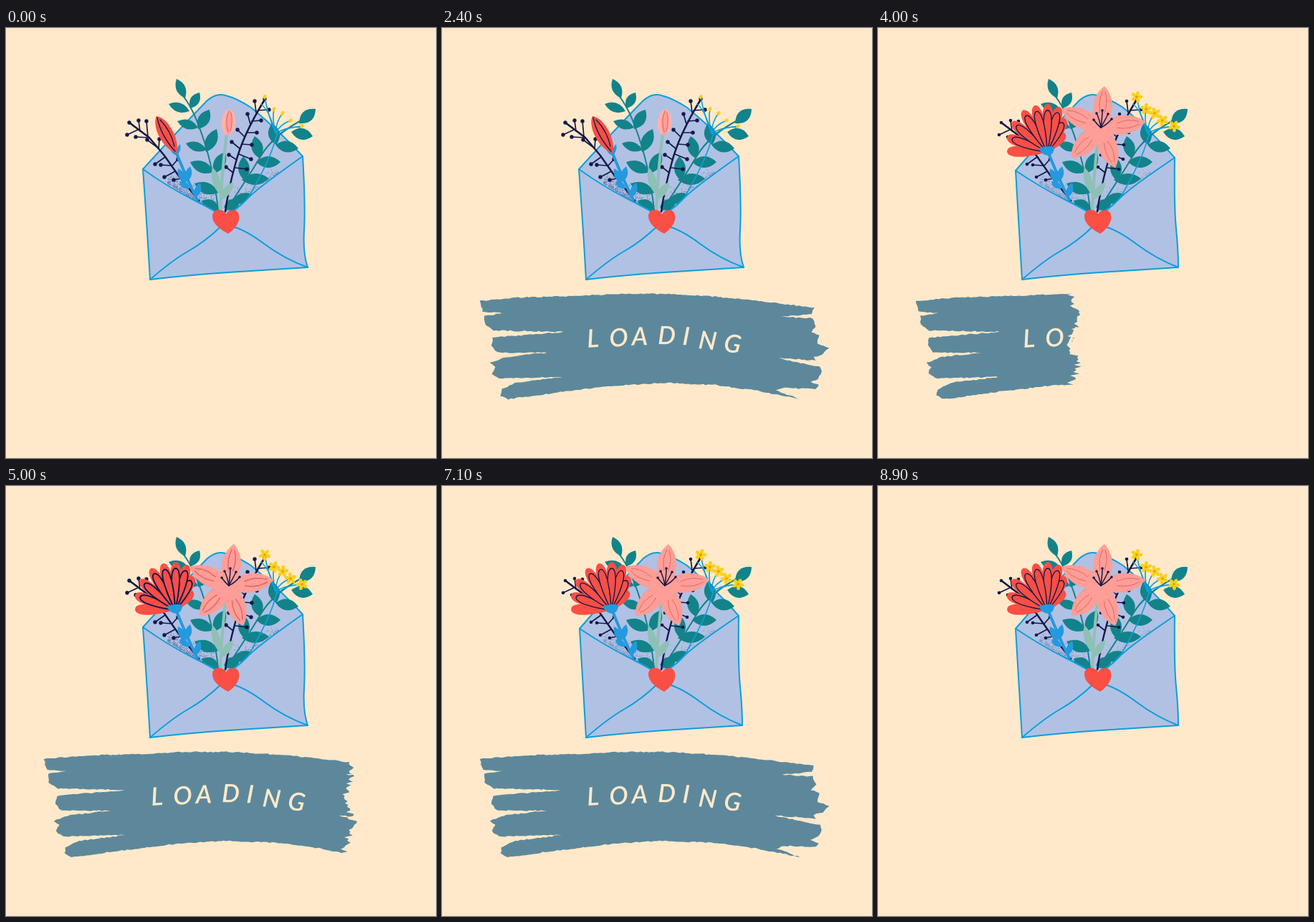
Write an HTML page that moves like this. It is 600 by 600 pixels and loops after 9 s.

```html
<!DOCTYPE html>
<html lang="en">
<head>
<meta charset="utf-8">
<title>Loading</title>
<style>
  html, body { margin: 0; width: 100%; height: 100%; overflow: hidden; background: #ffe9ca; }
  svg { display: block; width: 100vw; height: 100vh; }
  text { font: italic 600 35px Lato, "Open Sans", sans-serif; fill: #ffe9ca; }
</style>
</head>
<body>
<svg id="stage" viewBox="0 0 600 600" stroke-linecap="round" stroke-linejoin="round"></svg>
<script>
const C = {
  env: '#b0c1e4', line: '#0a9fdb', teal: '#12838a', navy: '#14194b', red: '#f94f45',
  pink: '#ff9e96', rose: '#ffb3aa', sage: '#8fc0b6', blue: '#2499dd', gold: '#f9d01a',
  orange: '#e89a10', vein: '#e2656b', brush: '#5d889b', dust: '#5f6f9e'
};

function rng(seed) {
  return () => {
    seed = (seed * 1664525 + 1013904223) >>> 0;
    return seed / 4294967296;
  };
}

const fill = (d, c) => `<path d="${d}" fill="${c}"/>`;
const stroke = (d, c, w = 2) => `<path d="${d}" fill="none" stroke="${c}" stroke-width="${w}"/>`;
const dot = (x, y, r, c) => `<circle cx="${x}" cy="${y}" r="${r}" fill="${c}"/>`;

// Pointed leaf from base to tip.
function leaf(x1, y1, x2, y2, w) {
  const len = Math.hypot(x2 - x1, y2 - y1);
  const nx = -(y2 - y1) / len * w, ny = (x2 - x1) / len * w;
  const mx = (x1 + x2) / 2, my = (y1 + y2) / 2;
  return `M${x1} ${y1}Q${mx + nx} ${my + ny} ${x2} ${y2}Q${mx - nx} ${my - ny} ${x1} ${y1}Z`;
}

// Petal whose sides bulge by a at fraction p and by b at fraction q.
function petal(x1, y1, x2, y2, a, p, b, q) {
  const dx = x2 - x1, dy = y2 - y1, len = Math.hypot(dx, dy);
  const at = (f, n) => `${x1 + dx * f - dy / len * n} ${y1 + dy * f + dx / len * n}`;
  return `M${x1} ${y1}C${at(p, a)} ${at(q, b)} ${x2} ${y2}C${at(q, -b)} ${at(p, -a)} ${x1} ${y1}Z`;
}

const leaves = (rows, c, w) => rows.map(r => fill(leaf(...r, w), c)).join('');

function twigs(stem, rows, r) {
  return stroke(stem, C.navy, 2.4) + rows.map(([x1, y1, x2, y2]) =>
    stroke(`M${x1} ${y1}L${x2} ${y2}`, C.navy, 1.7) + dot(x2, y2, r, C.navy)).join('');
}

function dust(opacity) {
  const rand = rng(7);
  let d = '';
  for (let i = 0; i < 900; i++) {
    const side = i % 5 < 3;
    const u = rand(), h = rand() * rand() * 42 * (0.35 + u * 0.65);
    const x = side ? 225 + u * 75 : 380 - u * 72;
    const y = (side ? 217 + u * 45 : 206 + u * 56) - h;
    d += `M${x.toFixed(1)} ${y.toFixed(1)}h.1`;
  }
  return `<g opacity="${opacity}">${stroke(d, C.dust, 1)}</g>`;
}

function foliage(v) {
  const r = v ? 2.3 : 2.7;
  return stroke('M296 256Q290 190 268 134Q260 112 248 96', C.teal, 2) +
    leaves([[250, 98, 238, 71], [257, 112, 270, 90]], C.teal, 13) +
    leaves([[256, 116, 227, 106], [268, 139, 239, 130], [280, 170, 251, 161]], C.teal, 13) +
    leaves([[268, 141, 284, 114], [279, 173, 294, 141], [290, 203, 306, 173],
      [290, 201, 257, 187], [296, 230, 263, 217], [297, 254, 273, 241]], C.teal, 16) +
    stroke('M306 256Q340 205 356 178T410 130', C.teal, 2) +
    leaves([[409, 133, 432, 113], [398, 145, 428, 151], [376, 163, 408, 168],
      [377, 163, 371, 133], [354, 182, 347, 151], [349, 187, 383, 187],
      [333, 213, 331, 179], [329, 212, 367, 210], [316, 239, 351, 237], [304, 250, 326, 244]], C.teal, 16) +
    twigs('M269 241L240 205L221 178L200 153L172 132', [
      [199, 152, 172, 132], [184, 142, 169, 149], [187, 144, 185, 129], [198, 152, 196, 130],
      [200, 153, 181, 152], [213, 168, 197, 156], [213, 168, 214, 155], [222, 180, 208, 190],
      [231, 192, 216, 191], [236, 200, 221, 208], [244, 210, 234, 212], [232, 192, 240, 183]], r) +
    twigs('M306 256Q310 226 320 190Q330 150 361 100', [
      [354, 111, 361, 99], [349, 118, 347, 102], [351, 115, 367, 114], [341, 134, 337, 120],
      [343, 130, 356, 129], [333, 152, 323, 142], [336, 146, 350, 146], [327, 169, 315, 159],
      [329, 162, 343, 163], [322, 184, 311, 177], [325, 176, 342, 183], [317, 202, 307, 194],
      [320, 195, 336, 197]], r) +
    stroke('M267 240Q252 210 236 170', C.blue, 4) +
    leaves([[251, 217, 240, 196], [252, 215, 257, 193], [264, 237, 271, 216], [256, 224, 242, 214]], C.blue, 9) +
    stroke('M299 254Q302 190 308 148', C.sage, 4) +
    leaves([[299, 233, 288, 194], [299, 240, 317, 215]], C.sage, 11);
}

const sprigs = [[361, 96], [374, 113], [386, 119], [397, 129], [413, 137]];

function yellow(open, v) {
  const stems = sprigs.map(([x, y]) => `M376 147Q${(x + 368) / 2} ${(y + 140) / 2} ${x} ${y}`).join('');
  let s = stroke('M335 242Q362 196 372 168T376 145' + stems, C.line, 1.6) +
    stroke('M376 147Q369 118 356 106M378 150Q395 136 411 139', C.line, 1.3);
  sprigs.forEach(([x, y], i) => {
    if (!open) {
      s += `<ellipse cx="${x}" cy="${y}" rx="2.3" ry="3" fill="${C.gold}" transform="rotate(${20 + i * 9} ${x} ${y})"/>`;
      return;
    }
    for (let k = 0; k < 5; k++) {
      const a = k * Math.PI * 0.4 + i + (v ? 0 : 0.35);
      s += fill(petal(x, y, x + 8.5 * Math.cos(a), y + 8.5 * Math.sin(a), 3, .3, 3.6, .9), C.gold);
    }
    s += dot(x, y, 1.7, C.orange);
  });
  return s;
}

function buds() {
  return fill(leaf(238, 178, 229, 166, 5) + leaf(238, 178, 243, 162, 5), C.blue) +
    fill(petal(238, 175, 210, 123, 14, .25, 13, .85), C.red) +
    stroke('M211 125Q216 150 236 172M215 128Q230 143 235 165', C.navy, 1.3) +
    fill(petal(309, 150, 312, 113, 14, .15, 13, .85), C.rose) +
    fill(petal(310, 150, 312, 114, 7, .2, 7, .8), C.pink) +
    stroke('M310 145Q305 128 311 116M313 144Q317 130 314 118', C.vein, 1);
}

function redFlower(v) {
  const tips = [[180, 172], [260, 146], [180, 152], [261, 126], [187, 131], [253, 110], [202, 115], [237, 106], [219, 108]];
  const lw = v ? 1.4 : 2;
  const shape = (k, w) => tips.map(([x, y]) =>
    petal(236, 173, 236 + (x - 236) * k, 173 + (y - 173) * k, w * .5, .35, w, .98));
  return shape(1, 13).map(d => fill(d, C.red)).join('') +
    shape(.87, 9.5).slice(2).map(d =>
      `<path d="${d}" fill="${C.red}" stroke="${C.navy}" stroke-width="${lw}"/>`).join('') +
    fill('M224 168Q236 163 246 166Q246 175 239 178Q229 178 224 168Z', C.blue);
}

function lily(v) {
  const cx = 311, cy = 139;
  const tips = [[v ? 316 : 318, 81], [373, 131], [331, 195], [270, 181], [256, 113]];
  let s = '';
  for (const [x, y] of tips) s += fill(petal(cx, cy, x, y, 19, .2, 17, .75), C.pink);
  for (const [x, y] of tips) {
    const dx = x - cx, dy = y - cy;
    for (const n of [-.1, .1]) {
      const at = (f, m) => `${cx + dx * f - dy * n * m} ${cy + dy * f + dx * n * m}`;
      s += stroke(`M${at(.36, .5)}Q${at(.62, 1.3)} ${at(.86, .3)}`, C.vein, v ? 1 : 1.5);
    }
  }
  for (const [x, y] of [[301, 128], [305, 119], [313, 115], [321, 120], [326, 127]]) {
    s += stroke(`M${cx} ${cy}Q${(x + cx) / 2 + 1} ${y + 8} ${x} ${y}`, C.navy, 1.5) + dot(x, y, 1.8, C.navy);
  }
  return s;
}

// Two hand-drawn outlines of the envelope: v = 0 or 1.
function envelope(v, inside, grain) {
  const l = v ? '192 199' : '191 197', r = v ? '414 181' : '414 179';
  const bl = '201 351', br = v ? '419 334' : '421 334';
  const flap = `M${l}Q240 143 281 101Q294 90 306 94Q322 98 342 111Q382 144 ${r}`;
  const fold = `M${l}Q228 223 262 240T303 264Q322 254 336 239T${r}`;
  const sides = `Q${v ? '413 250 416 280' : '418 250 416 282'}T${br}Q370 337 310 341T${bl}Q197 280 ${l}`;
  return fill(flap + 'L303 266Z', C.env) + dust(grain) + stroke(flap, C.line) + inside +
    fill(fold + sides + 'Z', C.env) + stroke(fold + sides, C.line) +
    stroke(`M${bl}Q232 324 255 311T302 275M${br}Q388 322 360 301T312 276`, C.line) +
    fill('M310 287Q287 275 288 261Q290 252 299 254Q305 255 307 260Q311 253 319 254Q327 257 325 268Q322 279 310 287Z', C.red);
}

function scene(open, v) {
  const blooms = open ? redFlower(v) + lily(v) : buds();
  const back = foliage(v) + yellow(open, v);
  // Blooms stand above the flap but behind the front fold.
  return envelope(v, back + blooms, v ? .45 : .85);
}

const outline = [
  [53, 381], [110, 376], [185, 374], [250, 371], [312, 371], [385, 375], [450, 382], [519, 390],
  [516, 399], [474, 403], [517, 405], [522, 416], [515, 424], [526, 429], [524, 440], [540, 447],
  [531, 455], [519, 459], [522, 464], [465, 460], [528, 473], [530, 480], [525, 489], [514, 494],
  [526, 498], [521, 504], [478, 502], [466, 506], [500, 518], [440, 506], [380, 498], [312, 495],
  [240, 499], [165, 508], [92, 518], [82, 513], [83, 504], [102, 495], [168, 487], [80, 489],
  [70, 482], [74, 473], [67, 467], [90, 459], [146, 453], [77, 453], [69, 443], [71, 432],
  [170, 424], [72, 422], [60, 414], [59, 402], [84, 398], [57, 396]
];

// Rough brush edge, subdivided and shaken.
function rough(seed) {
  const rand = rng(seed), pts = [];
  outline.forEach(([x, y], i) => {
    const [x2, y2] = outline[(i + 1) % outline.length];
    const n = Math.max(1, Math.round(Math.hypot(x2 - x, y2 - y) / 4));
    for (let k = 0; k < n; k++) {
      const j = () => (rand() - .5) * 1.6;
      pts.push((x + (x2 - x) * k / n + j()).toFixed(1) + ' ' + (y + (y2 - y) * k / n + j()).toFixed(1));
    }
  });
  return 'M' + pts.join('L') + 'Z';
}

const strokes = [11, 23, 37].map(rough);
const poses = { bud: scene(false, 0), openA: scene(true, 0), openB: scene(true, 1) };

const stage = document.getElementById('stage');
stage.innerHTML = `
  <clipPath id="wipe"><path id="edge"/></clipPath>
  ${Object.entries(poses).map(([id, s]) => `<g id="${id}">${s}</g>`).join('')}
  <path id="paint" fill="${C.brush}" clip-path="url(#wipe)"/>
  <text x="203 234 265 301 335 357 392" y="446 445 443 441 442 447 451" rotate="-4 -3 -2 1 4 6 8">LOADING</text>`;

const el = id => document.getElementById(id);
const paint = el('paint'), edge = el('edge');
const groups = Object.keys(poses).map(el);

const bloom = [
  [0, 'bud'], [250, 'openB'], [450, 'openA'], [650, 'openB'], [850, 'openA'], [1000, 'openB'],
  [1150, 'openA'], [1350, 'openB'], [1550, 'openA'], [1720, 'openB'], [1920, 'openA'], [2120, 'openB']
];

// Right end of the brush stroke: painted on, held, wiped back.
function reach(t) {
  const x = t < 2000 ? 30 + t * .9 : 275 - (t - 4000) * .887;
  return Math.max(30, Math.min(570, x));
}

function wipePath(x) {
  if (x <= 30) return 'M0 0Z';
  const rand = rng(Math.round(x));
  let d = 'M0 360';
  for (let y = 360; y <= 530; y += 2.5) {
    const tip = 5 * Math.sin(y / 11 - 35) - 2 + (rand() - .5) * 14;
    d += `L${(x + tip).toFixed(1)} ${y}`;
  }
  return d + 'L0 530Z';
}

let last = -1;
function draw(now) {
  const step = Math.floor((now % 9000) / 100);
  if (step !== last) {
    last = step;
    const t = step * 100;
    const pose = bloom.filter(([at]) => at <= t % 2250).pop()[1];
    groups.forEach(g => { g.style.display = g.id === pose ? '' : 'none'; });
    paint.setAttribute('d', strokes[step % strokes.length]);
    edge.setAttribute('d', wipePath(reach(t % 4500)));
  }
  requestAnimationFrame(() => draw(performance.now() - start));
}
const start = performance.now();
draw(0);
</script>
</body>
</html>
```
